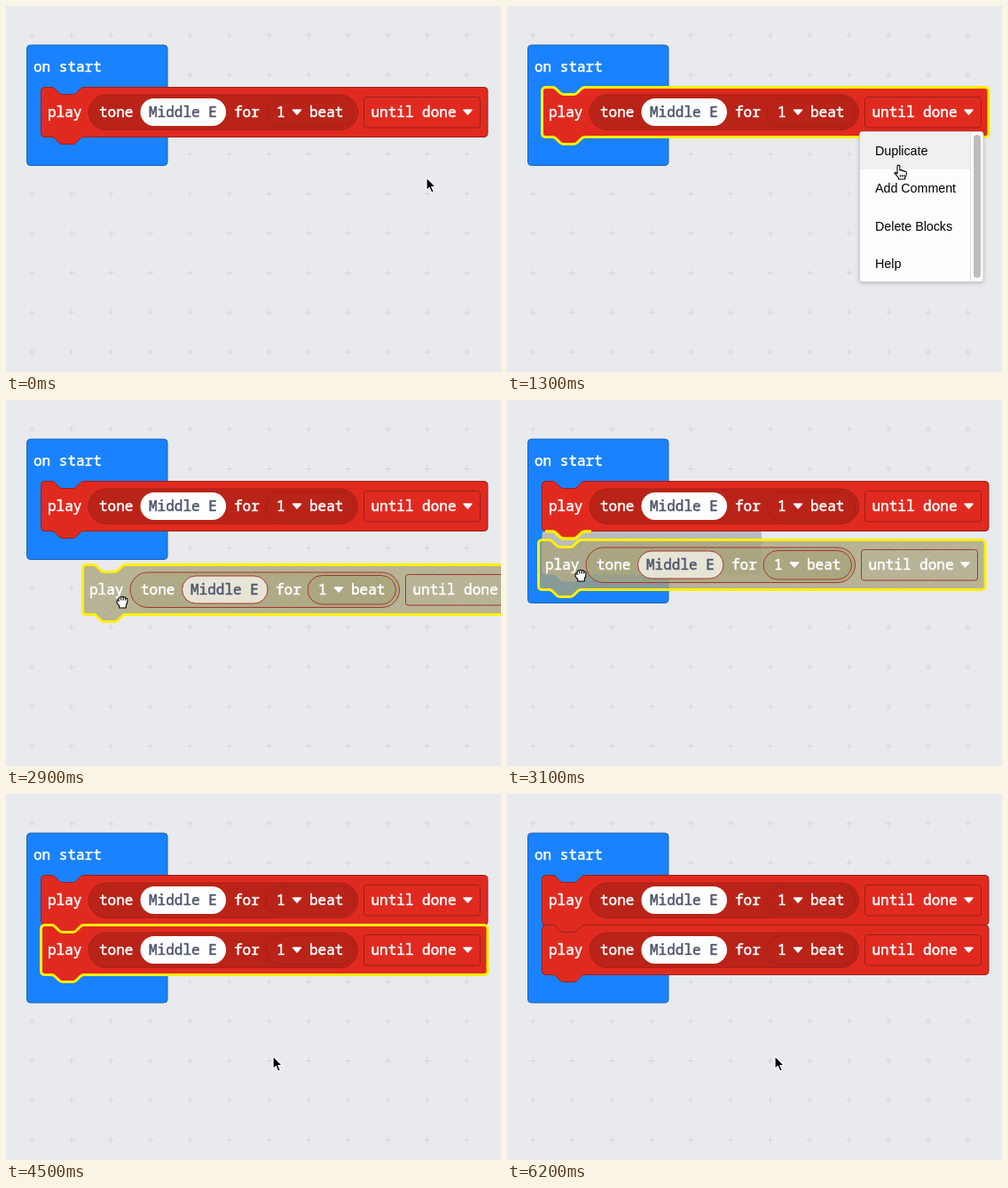
Write an HTML page that moves like this. It is 558 by 412 pixels and loops after 6300 ms.

```html
<!DOCTYPE html>
<html lang="en">
<head>
<meta charset="utf-8">
<title>Duplicating a block</title>
<style>
  html, body { margin: 0; width: 100%; height: 100%; overflow: hidden; background: #e8eaee; }
  svg { display: block; width: 558px; height: 412px; }
  text { white-space: pre; }
  .code { font: 500 16px "Noto Sans Mono", "DejaVu Sans Mono", monospace; fill: #fff; }
  .code text, text.code { stroke: #fff; stroke-width: .5; }
  .event { fill: #1a82fe; stroke: #1b62b4; }
  .body { fill: #e12a1f; stroke: #98211a; }
  .pill { fill: #b92318; stroke: #ab2017; }
  .field { fill: none; stroke: #98211a; }
  .note { fill: #fff; }
  .code .note-text { fill: #50576c; stroke: #50576c; }
  .selected .body { stroke: #fff000; stroke-width: 3; }
  .disabled .body { fill: url(#hatch); fill-opacity: .76; }
  .disabled .pill { fill: url(#hatch); fill-opacity: .55; stroke: #a5352b; }
  .disabled .note { fill: #f1efe6; fill-opacity: .85; stroke: #a5352b; }
  .disabled .field { stroke: #a5352b; }
  .menu { font: 14.25px "Liberation Sans", Arial, sans-serif; fill: #000; }
  .panel { fill: #fdfdfd; stroke: #d0d1d4; filter: drop-shadow(0 1px 2px #0003); }
  .hand { fill: #fff; stroke: #000; stroke-width: 1.1; stroke-linejoin: round; }
</style>
</head>
<body>
<svg viewBox="0 0 558 412">
  <defs>
    <pattern id="grid" x="6.7" y="10.7" width="44.57" height="44.57" patternUnits="userSpaceOnUse">
      <path d="M19 22.3h7M22.5 18.8v7" stroke="#d4d6da"/>
    </pattern>
    <pattern id="hatch" width="10" height="10" patternUnits="userSpaceOnUse">
      <path d="M0 0h10v10H0z" fill="#a5a184"/>
      <path d="M0 0 10 10M10 0 0 10" stroke="#b3ab55"/>
    </pattern>
  </defs>
  <rect width="558" height="412" fill="url(#grid)"/>
  <rect id="event" class="event" x="23.5" y="44" width="158.5" height="135.5" rx="4"/>
  <text class="code" x="31" y="74">on start</text>
  <path id="marker" fill="#b9bbbd"/>
  <g id="first"></g>
  <path id="joint" fill="none" stroke="#fff000" stroke-width="3.5"/>
  <g id="copy"></g>
  <g id="menu" class="menu">
    <rect class="panel" x="397.5" y="141.5" width="139.5" height="169" rx="3"/>
    <path d="M398 142h124v42H398z" fill="#f0f0f1"/>
    <path d="M522.5 142v168" stroke="#dedede"/>
    <rect x="526" y="145" width="8" height="161" rx="4" fill="#bdbdbd"/>
    <text x="415" y="168">Duplicate</text>
    <text x="415" y="210">Add Comment</text>
    <text x="415" y="253">Delete Blocks</text>
    <text x="415" y="295">Help</text>
  </g>
  <g id="cursor">
    <path id="arrow" d="M0 0V14.5L3.3 11.5 5.7 17 8.3 15.9 5.9 10.5H10.4Z" fill="#000" stroke="#fff" stroke-width="1.2"/>
    <path id="open" class="hand" d="M-4 2V-4q1-2 2.2 0 0-3.4 2.3-2.4 2-1 2.3 1.4 2.2-.8 2.2 1.2 2-.5 2 1.5 0 4-2 6.3V7H-2.5V5.5L-7 0q.7-2 3 2z"/>
    <path id="point" class="hand" d="M-3.5 2V-6.500a1.4 1.4 0 0 1 2.8 0V-2q2.6-1 2.8.6 2.4-.6 2.6.8 2.2-.3 2.2 1.6 0 3.6-1.8 5.4V8H-2V6.5L-6.6 1.2q.6-2 3.1.8zM-.2 3v2.500M2 3v2.500M4.200 3v2.500"/>
    <path id="grab" class="hand" d="M-6 0q0-2.400 2-2.200Q-4-5.600-1.500-4.800-.8-6.500 1-5 3-6 3.500-4 6-4.300 6-1.700 6.200 2 4.300 4.200V7H-3.300V4.500Q-6.500 2-6 0zM-3.900-2v2M-1.300-4v2.500M1.200-4.500v3M3.700-3.500v2"/>
  </g>
</svg>
<script>
const STEP = 100, STEPS = 63;
const $ = id => document.getElementById(id);

const notch = 'c2 0 3 1 4 2l4 4c1 1 2 2 4 2h12c2 0 3-1 4-2l4-4c1-1 2-2 4-2';
const notchBack = 'c-2 0-3 1-4 2l-4 4c-1 1-2 2-4 2h-12c-2 0-3-1-4-2l-4-4c-1-1-2-2-4-2';
const statement = (right, height) =>
  `M39.5 95.5a4 4 0 0 1 4-4h8${notch}H${right - 4}a4 4 0 0 1 4 4v${height - 8}` +
  `a4 4 0 0 1-4 4H87.5${notchBack}h-8a4 4 0 0 1-4-4z`;
const caret = x =>
  `<path d="M${x - 4.5} 117h9l-4.5 5z" fill="#fff" stroke="#fff" stroke-width="1.5" stroke-linejoin="round"/>`;
const label = (x, words, kind = '') => `<text x="${x}" y="125" class="${kind}">${words}</text>`;

const playBlock = `<g class="code">
  <path class="body" d="${statement(543, 56)}"/>
  <rect class="pill" x="93" y="100" width="303.5" height="39.5" rx="19.75"/>
  <rect class="pill" x="293" y="103.5" width="99.5" height="32.5" rx="16.25"/>
  <rect class="note" x="151.5" y="104" width="96.5" height="31" rx="15.5"/>
  <rect class="field" x="403.5" y="102.5" width="131" height="34.5" rx="3"/>
  ${label(47, 'play')}${label(105, 'tone')}${label(161, 'Middle E', 'note-text')}
  ${label(257, 'for')}${label(305, '1')}${caret(328)}${label(342, 'beat')}
  ${label(411.5, 'until done')}${caret(520.5)}</g>`;

$('first').innerHTML = $('copy').innerHTML = playBlock;
$('marker').setAttribute('d', statement(287, 49));
$('marker').setAttribute('transform', 'translate(0 56)');
$('joint').setAttribute('d', `M43 148h8.5${notch}H95`);

// Each key: step, x, y
const cursorPath = [
  [0, 474, 193], [2, 473, 192], [7, 400, 141], [9, 398, 141], [13, 443.5, 187],
  [18, 443, 186], [21, 360, 206], [25, 165, 222], [28, 131, 221], [29, 131, 227],
  [31, 83, 197], [33, 88, 188], [34, 140, 215], [35, 225, 250], [36, 278, 286],
  [37, 295, 297], [39, 297, 297], [43, 301, 295], [53, 301, 295], [55, 302, 295]
];
const copyPath = [[28, 47, 88], [29, 47, 94], [31, -4, 66], [33, 0, 56]];

function along(path, step) {
  const next = path.findIndex(key => key[0] > step);
  if (next < 0) return path.at(-1).slice(1);
  if (next === 0) return path[0].slice(1);
  const [a, b] = [path[next - 1], path[next]];
  const k = (step - a[0]) / (b[0] - a[0]);
  return [a[1] + (b[1] - a[1]) * k, a[2] + (b[2] - a[2]) * k];
}

function cursorKind(step) {
  if (step >= 6 && step < 10 || step >= 20 && step < 29) return 'open';
  if (step >= 10 && step < 17) return 'point';
  if (step >= 29 && step < 33) return 'grab';
  return 'arrow';
}

const show = (id, visible) => { $(id).style.display = visible ? '' : 'none'; };
const move = (id, [x, y]) => $(id).setAttribute('transform', `translate(${x} ${y})`);

// Motion advances in whole steps, so the pose is held between them.
function draw(step) {
  const hasCopy = step >= 17, placed = step >= 33, preview = step >= 30 && !placed;
  $('event').setAttribute('height', placed ? 191 : preview ? 184.5 : 135.5);
  $('first').setAttribute('class', step >= 8 && !hasCopy ? 'selected' : '');
  $('copy').setAttribute('class',
    `${hasCopy && step < 49 ? 'selected' : ''} ${placed ? '' : 'disabled'}`);
  show('marker', preview);
  show('joint', preview);
  show('copy', hasCopy);
  show('menu', step >= 9 && step < 17);
  for (const kind of ['arrow', 'open', 'point', 'grab']) show(kind, kind === cursorKind(step));
  move('copy', along(copyPath, step));
  move('cursor', along(cursorPath, step));
}

const start = performance.now();
function tick() {
  draw(Math.floor((performance.now() - start) / STEP) % STEPS);
  requestAnimationFrame(tick);
}
tick();
</script>
</body>
</html>
```
